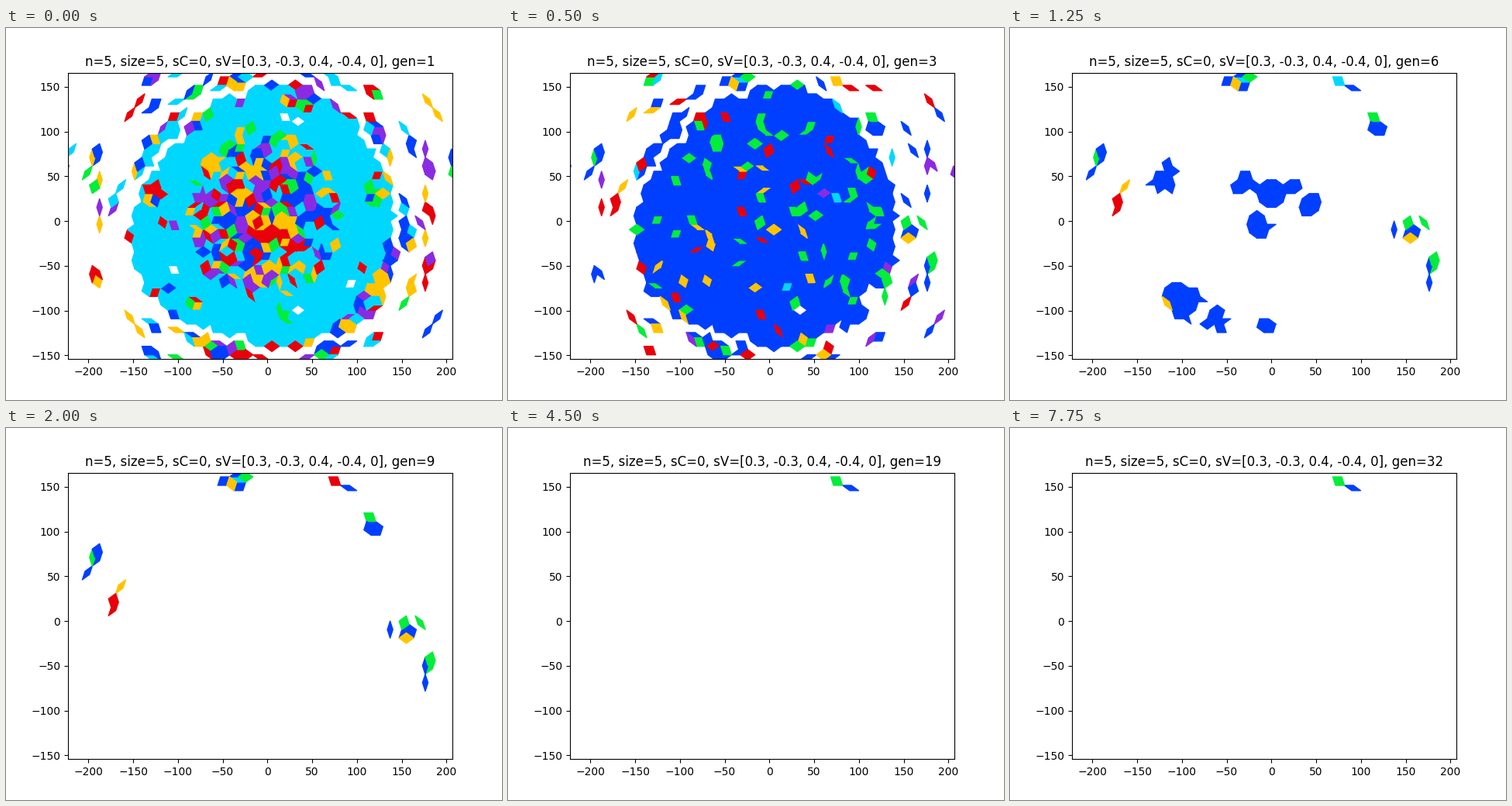
Recreate the animation shown at these times as a matplotlib script. Size 640 px wide and 480 px high, loop 8 s.

```python
from collections import Counter
from itertools import combinations, product

import matplotlib.pyplot as plt
import numpy as np
from matplotlib.animation import FuncAnimation
from matplotlib.collections import PolyCollection
from matplotlib.colors import to_rgba

plt.rcParams["text.kerning_factor"] = 6

SIZE = 5
SHIFT = np.array([0.3, -0.3, 0.4, -0.4, 0])
EDGE = 10
GENERATIONS = 32
ORIGIN, SCALE = np.array([337.3, 249.15]), 1.155  # stage pixels
CENTRE = (330, 242)

BLUE, GREEN, RED, PURPLE, YELLOW, CYAN, EMPTY = range(7)
PALETTE = np.array([to_rgba(c) for c in (
    "#003FFF", "#03ED3A", "#E8000B", "#8A2BE2", "#FFC400", "#00D7FF")]
    + [(1, 1, 1, 0)])

# key places on the stage: (x, y) or (x, y, radius)
GAPS = [(359, 115), (377, 120), (217, 312), (444, 330), (377, 364)]
CLUSTERS = [(187, 210, 20), (480, 210, 20), (378, 92, 20),
            (245, 118, 20), (245, 360, 14)]
LANDS = [(330, 250, 102), (335, 165, 34), (290, 330, 60), (400, 275, 42),
         (360, 395, 33), (430, 170, 42), (205, 205, 32), (205, 325, 34),
         (270, 113, 24), (360, 85, 18), (478, 300, 20), (264, 410, 20)]
ISLANDS = [(302, 200, 15), (336, 212, 18), (318, 256, 16), (362, 204, 9),
           (390, 228, 13), (198, 190, 20), (222, 352, 24), (262, 378, 15),
           (334, 384, 10), (295, 68, 22), (474, 122, 15), (112, 170, 20),
           (141, 218, 20), (515, 258, 22), (546, 312, 24)]
BLINKER, ANCHOR = (424, 69), (442, 78)

angles = 2 * np.pi * np.arange(5) / 5
DIRS = np.column_stack([np.cos(angles), np.sin(angles)])


def build_tiles():
    """Rhombs dual to the pentagrid crossings; lone rhombs are dropped."""
    tiles = []
    for i, j in combinations(range(5), 2):
        inverse = np.linalg.inv(DIRS[[i, j]])
        for a, b in product(range(-SIZE, SIZE + 1), repeat=2):
            point = inverse @ (a - SHIFT[i], b - SHIFT[j])
            index = np.ceil(np.round(DIRS @ point + SHIFT, 9)).astype(int)
            corners = []
            for da, db in ((0, 0), (1, 0), (1, 1), (0, 1)):
                index[i], index[j] = a + da, b + db
                corners.append(tuple(int(v) for v in index))
            tiles.append(corners)
    shared = Counter(c for tile in tiles for c in tile)
    tiles = [t for t in tiles if any(shared[c] > 1 for c in t)]
    return np.array(tiles) @ DIRS * EDGE


tiles = build_tiles()
centres = ORIGIN + tiles.mean(axis=1) * (SCALE, -SCALE)
count = len(tiles)
rng = np.random.default_rng(5)


def distance(x, y, rx=1, ry=None):
    return np.hypot((centres[:, 0] - x) / rx, (centres[:, 1] - y) / (ry or rx))


def nearest(point):
    return np.argmin(distance(*point))


def in_discs(discs, grow=1.0):
    return np.any([distance(x, y) < r * grow for x, y, r in discs], axis=0)


def chance(p):
    return rng.random(count) < p


gaps = np.linalg.norm(centres[:, None] - centres[None], axis=2)
np.fill_diagonal(gaps, np.inf)
neighbour = gaps.argmin(axis=1)


def mix(weights):
    """Random colours that clump a little; weights follow the palette."""
    colours = rng.choice(6, count, p=np.array(weights) / sum(weights))
    return np.where(chance(0.35), colours[neighbour], colours)


radius = distance(*CENTRE)
bulk = radius < 168


def early(bulk_colour, outer, core, core_mix, density):
    """Uniform disc with a speckled core and a loose outer ring."""
    state = np.where(bulk, bulk_colour, mix(outer))
    d = distance(*core)
    lively = (d < 1) & chance(density * (1.15 - 0.5 * d ** 3))
    lively |= in_discs(CLUSTERS) & chance(0.7)
    stray = bulk & chance(0.03)
    state = np.where(lively | stray, mix(core_mix), state)
    for gap in GAPS:
        state[nearest(gap)] = EMPTY
    return state


def shrinking(gen):
    """The islands die from the middle outwards, all but one pair."""
    alive = [disc for disc in ISLANDS
             if gen <= max(6, 5 + np.hypot(disc[0] - CENTRE[0],
                                           disc[1] - CENTRE[1]) // 40)]
    state = np.full(count, EMPTY)
    if alive:
        land = in_discs(alive)
        state[land] = late_colours[land]
    state[nearest(BLINKER)] = CYAN if gen <= 6 else RED if gen <= 12 else GREEN
    state[nearest(ANCHOR)] = BLUE
    return state


first = early(CYAN, (4, 1, 2, 2, 3, 2), (333, 243, 98, 112),
              (4, 3, 4, 4, 5, 2), 0.85)
second = early(GREEN, (6, 1, 2, 2, 2, 1), (335, 232, 90, 98),
               (4, 3, 4, 4, 2, 1), 0.8)

accents = mix((0, 5, 3, 1, 2, 1))
late_colours = np.where((radius > 170) & chance(0.5), accents, BLUE)

land = in_discs(LANDS) & chance(0.91) | in_discs(ISLANDS)
fourth = np.where(land, np.where(chance(0.09), accents, late_colours), EMPTY)

third = np.where(bulk & chance(0.88), BLUE, second)
third[~bulk & chance(0.5)] = EMPTY
third = np.where(land, fourth, third)

sixth = shrinking(6)
fifth = np.where(in_discs(LANDS, 0.7) & chance(0.9), fourth, EMPTY)
fifth = np.where(sixth != EMPTY, sixth, fifth)

states = [first, second, third, fourth, fifth] + [
    shrinking(gen) for gen in range(6, GENERATIONS + 1)]

fig, ax = plt.subplots(figsize=(6.4, 4.8), dpi=100)
ax.set_xlim((80 - ORIGIN[0]) / SCALE, (576 - ORIGIN[0]) / SCALE)
ax.set_ylim((ORIGIN[1] - 427.2) / SCALE, (ORIGIN[1] - 57.6) / SCALE)
mosaic = PolyCollection(tiles, linewidths=1)
ax.add_collection(mosaic, autolim=False)
title = ax.set_title("")


def update(i):
    colours = PALETTE[states[i]]
    mosaic.set_facecolor(colours)
    mosaic.set_edgecolor(colours)
    title.set_text(f"n=5, size=5, sC=0, sV=[0.3, -0.3, 0.4, -0.4, 0], gen={i + 1}")
    return mosaic, title


anim = FuncAnimation(fig, update, frames=GENERATIONS, interval=250,
                     repeat=True, repeat_delay=0, blit=False)
plt.show()
```
